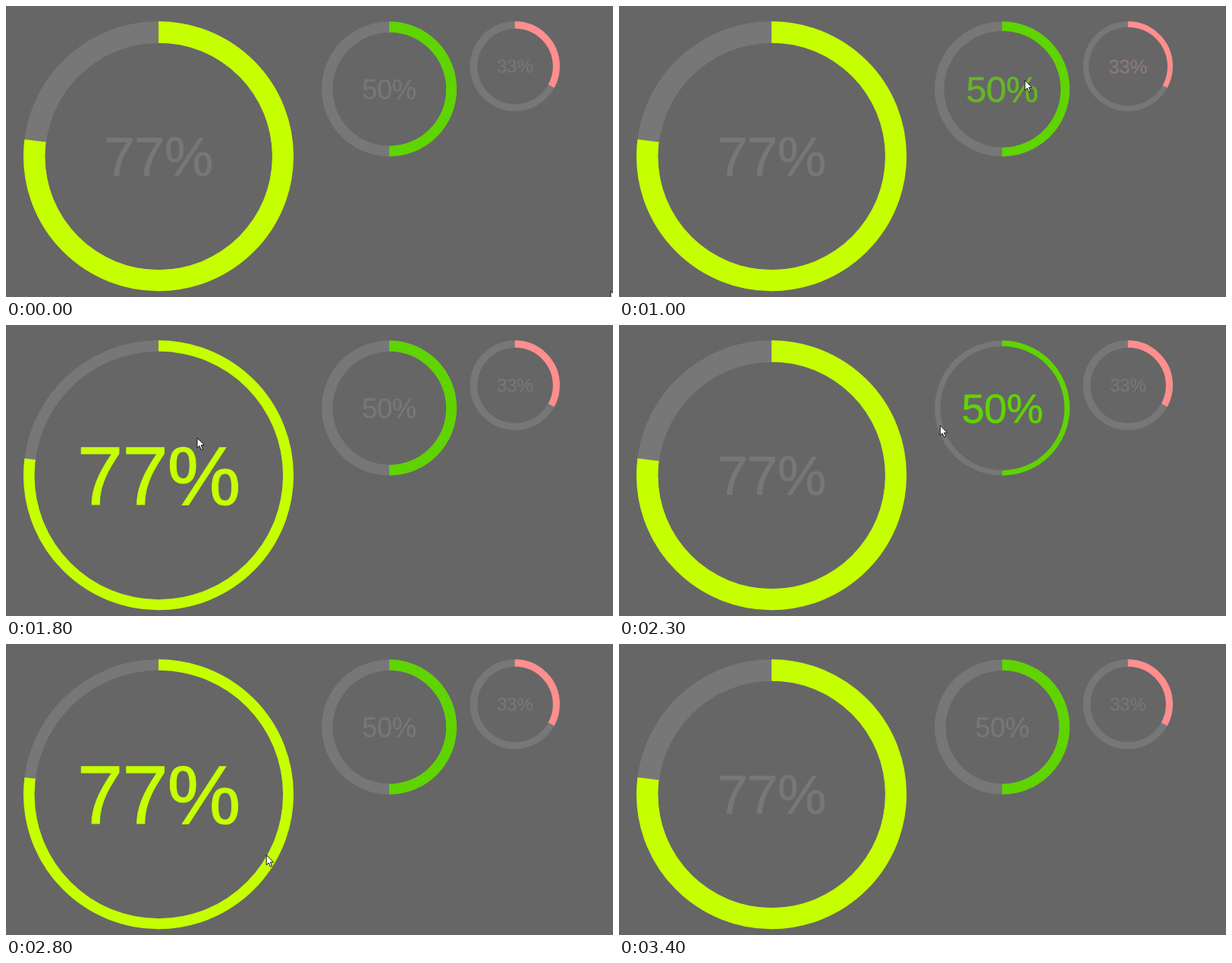
Write an HTML page that moves like this. It is 800 by 384 pixels and loops after 3.5 s.

```html
<!DOCTYPE html>
<html lang="en">
<head>
<meta charset="utf-8">
<title>Percentage rings</title>
<style>
  html, body { margin: 0; width: 100%; height: 100%; overflow: hidden; background: #666; }
  svg { display: block; width: 800px; height: 384px; }
  text {
    font-family: "Liberation Sans", Arial, sans-serif;
    text-anchor: middle;
    letter-spacing: -0.011em;
    stroke-width: 0.01em;
  }
</style>
</head>
<body>
<svg viewBox="0 0 800 384">
  <g id="rings"></g>
  <path id="cursor" d="M0 0V13.2L3 10.4L5.2 15.5L7.4 14.6L5.2 9.6H9.3Z"
        fill="#fff" stroke="#111" stroke-linejoin="round"/>
</svg>
<script>
const LOOP = 3500, STEP = 100, FADE = 200, LAG = 40;
const GREY = [119, 119, 119];

const rings = [
  { cx: 201, cy: 198.2, size: 356, value: 77, color: [198, 255, 0] },
  { cx: 505, cy: 109.5, size: 178, value: 50, color: [95, 212, 0] },
  { cx: 670.7, cy: 79.5, size: 118.4, value: 33, color: [255, 142, 142] }
];

// turning points of the pointer: time, x, y
const path = [
  [0, 797, 376], [600, 724, 128], [820, 612, 100], [1000, 535, 98],
  [1520, 416, 109], [1600, 340, 112], [1800, 252, 149], [2150, 478, 122],
  [2320, 416, 134], [2500, 297, 144], [3000, 374, 368], [3100, 380, 388]
];

const cursor = document.getElementById("cursor");
const layer = document.getElementById("rings");
const clamp = x => Math.min(1, Math.max(0, x));
const mix = (a, b, k) => a + (b - a) * k;

function add(tag, attrs) {
  const el = document.createElementNS("http://www.w3.org/2000/svg", tag);
  for (const key in attrs) el.setAttribute(key, attrs[key]);
  return layer.appendChild(el);
}

// cubic-bezier(.42, 0, 1, 1), solved by bisection
function easeIn(x) {
  let lo = 0, hi = 1, s = 0.5;
  for (let i = 0; i < 24; i++) {
    s = (lo + hi) / 2;
    const bx = 1.26 * s * (1 - s) ** 2 + 3 * s * s * (1 - s) + s ** 3;
    if (bx < x) lo = s; else hi = s;
  }
  return s * s * (3 - 2 * s);
}
const easeOut = x => 1 - easeIn(1 - x);

function pointerAt(t) {
  const next = path.findIndex(p => p[0] > t);
  if (next < 0) return path[path.length - 1].slice(1);
  const a = path[next - 1], b = path[next];
  const k = (t - a[0]) / (b[0] - a[0]);
  return [mix(a[1], b[1], k), mix(a[2], b[2], k)];
}

// times at which the pointer enters and leaves the ring's square, alternating
function findCrossings({ cx, cy, size }) {
  const times = [];
  for (let t = 0; t < LOOP; t += 2) {
    const [x, y] = pointerAt(t);
    const inside = Math.max(Math.abs(x - cx), Math.abs(y - cy)) < size / 2;
    if (inside !== (times.length % 2 === 1)) times.push(t + LAG);
  }
  return times;
}

function hoverAmount(crossings, t, ease) {
  const past = crossings.filter(c => c <= t);
  if (!past.length) return 0;
  const k = ease(clamp((t - past[past.length - 1]) / FADE));
  return past.length % 2 ? k : 1 - k;
}

for (const ring of rings) {
  const { cx, cy, size, value, color } = ring;
  add("circle", { cx, cy, r: size / 2, fill: "#777" });
  add("circle", {
    cx, cy, r: size * 0.46, fill: "none", stroke: `rgb(${color})`, "stroke-width": size * 0.08,
    pathLength: 100, "stroke-dasharray": `${value} ${100 - value}`, transform: `rotate(-90 ${cx} ${cy})`
  });
  ring.hole = add("circle", { cx: cx + 0.3, cy: cy + 0.3, fill: "#666" });
  ring.label = add("text", { x: cx, y: cy, dy: "0.36em" });
  ring.label.textContent = value + "%";
  ring.crossings = findCrossings(ring);
}

function draw(t) {
  for (const { size, color, crossings, hole, label } of rings) {
    const grow = hoverAmount(crossings, t, easeOut);
    const thin = hoverAmount(crossings, t, easeIn);
    const ink = `rgb(${GREY.map((c, i) => Math.round(mix(c, color[i], grow)))})`;
    hole.setAttribute("r", size * mix(0.42, 0.46, thin));
    label.setAttribute("font-size", size * mix(0.204, 0.306, grow));
    label.setAttribute("fill", ink);
    label.setAttribute("stroke", ink);
  }
  cursor.setAttribute("transform", `translate(${pointerAt(t)})`);
}

const start = performance.now();
function tick() {
  const t = (performance.now() - start) % LOOP;
  draw(Math.floor(t / STEP) * STEP);
  requestAnimationFrame(tick);
}
tick();
</script>
</body>
</html>
```
